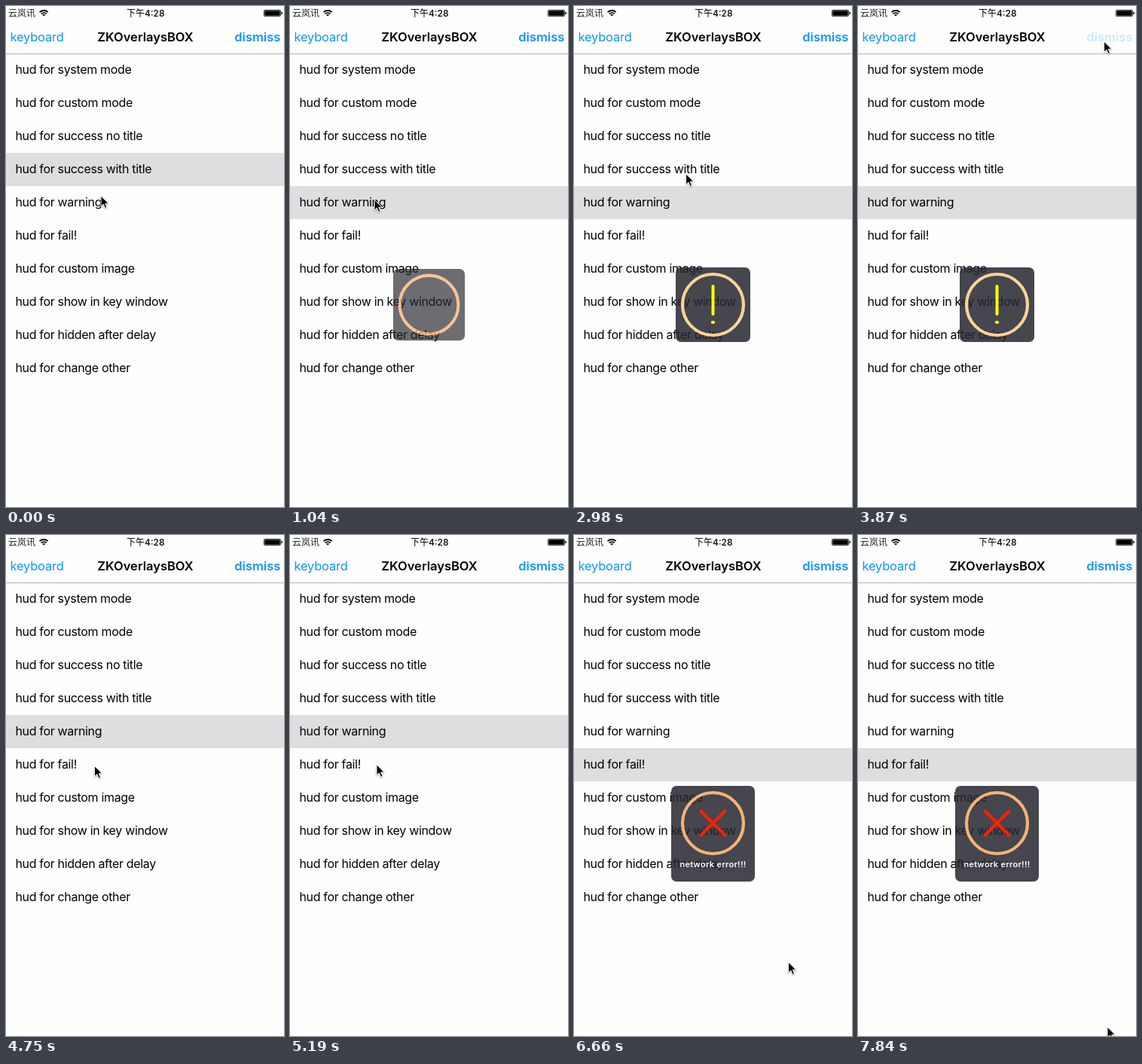
Recreate the animation shown at these times as an HTML page. Size 369 by 665 pixels, loop 7.99 s.

```html
<!DOCTYPE html>
<html lang="zh">
<head>
<meta charset="utf-8">
<title>HUD list</title>
<style>
  html, body { margin: 0; width: 100%; height: 100%; overflow: hidden; background: #fefefe; }
  svg { display: block; width: 100%; height: 100%; }
  text { font-family: Inter, "Noto Sans CJK SC", "Noto Sans CJK", sans-serif; white-space: pre; }
  .row { font-size: 16px; letter-spacing: -.33px; }
  .nav { font-size: 16.5px; }
  .bold { font-weight: 600; }
  .blue { fill: #0f94ff; }
  .status { font-size: 12px; }
  .panel { fill: #252630; fill-opacity: .85; }
  .ring { fill: none; stroke: #f6b275; stroke-width: 4.2; }
  .stroke { fill: none; stroke-width: 4; stroke-linecap: round; }
  #arrow { filter: drop-shadow(.5px 1.5px 1px rgba(0, 0, 0, .35)); }
</style>
</head>
<body>
<svg viewBox="0 0 369 665" preserveAspectRatio="none">
  <rect width="369" height="665" fill="#fefefe"/>
  <rect id="mark" width="369" height="44" fill="#dedede"/>

  <text class="status" x="3" y="13.5" fill="#222">云岚讯</text>
  <g fill="none" stroke="#000" stroke-width="1.8">
    <path d="M44.6 8.2a8 8 0 0 1 11 0M46.7 10.5a5 5 0 0 1 6.8 0"/>
    <path d="M50.1 13.8l-1.9-2a2.8 2.8 0 0 1 3.8 0z" fill="#000" stroke="none"/>
  </g>
  <text class="status" x="160" y="13.5" font-weight="500">下午4:28</text>
  <rect x="342.4" y="5.4" width="22.2" height="8.2" rx="1.4" fill="none" stroke="#000" stroke-width=".8"/>
  <rect x="343.3" y="6.3" width="20.4" height="6.4" rx=".6"/>
  <path d="M365.5 7.8q1.6.2 1.6 1.7t-1.6 1.7z"/>

  <text class="nav blue" x="5.4" y="47" letter-spacing="-.2">keyboard</text>
  <text class="nav bold" x="185" y="47" text-anchor="middle">ZKOverlaysBOX</text>
  <text id="dismiss" class="nav bold blue" x="364.3" y="47" text-anchor="end">dismiss</text>
  <rect y="63" width="369" height="1" fill="#b4b4b4"/>
  <g id="rows"></g>

  <g id="warning">
    <rect class="panel" x="-49.5" y="-49.5" width="99" height="99" rx="7"/>
    <circle id="warnRing" class="ring" r="40.5"/>
    <g id="bang">
      <path id="bar" class="stroke" stroke="#ffff00" d="M0 -24.5V12.5" stroke-dasharray="37 60"/>
      <ellipse id="dot" cy="23.3" rx="2.7" ry="2.1" fill="#ffff00"/>
    </g>
  </g>

  <g id="fail">
    <rect class="panel" x="-55.5" y="-63.5" width="111" height="127" rx="7"/>
    <circle class="ring" cy="-14" r="40.5"/>
    <g id="cross">
      <path class="stroke" stroke="#ff2000" d="M-16 -16L16 16M16 -16L-16 16"/>
    </g>
    <text class="bold" y="44.5" font-size="11" letter-spacing=".3" fill="#fff" text-anchor="middle">network error!!!</text>
  </g>

  <g id="arrow">
    <path d="M0 0V14.2L3.3 11.1L5.6 16.4L8 15.4L5.7 10.2H10.2Z" stroke="#fff" stroke-width="1" stroke-linejoin="round"/>
  </g>
</svg>
<script>
  const LOOP = 7990, BEATS = 54, BEAT = LOOP / BEATS;
  const $ = id => document.getElementById(id);
  const set = (id, name, value) => $(id).setAttribute(name, value);

  const labels = ["system mode", "custom mode", "success no title", "success with title", "warning",
    "fail!", "custom image", "show in key window", "hidden after delay", "change other"];
  labels.forEach((label, i) => {
    const row = document.createElementNS("http://www.w3.org/2000/svg", "text");
    row.setAttribute("class", "row");
    row.setAttribute("x", 12.4);
    row.setAttribute("y", 90 + 44 * i);
    row.textContent = "hud for " + label;
    $("rows").append(row);
  });

  // Keys are [beat, value, ...]; returns the interpolated values.
  function at(n, keys) {
    const i = keys.findIndex(k => k[0] > n);
    if (i === 0) return keys[0].slice(1);
    if (i < 0) return keys[keys.length - 1].slice(1);
    const a = keys[i - 1], b = keys[i], p = (n - a[0]) / (b[0] - a[0]);
    return a.slice(1).map((v, j) => v + (b[j + 1] - v) * p);
  }

  const pointer = [
    [2, 126, 252], [5, 112, 257], [7, 112, 257], [8, 113, 258], [19, 113, 258],
    [25, 326.5, 47], [27, 326.5, 47], [32, 117.5, 306.5], [34, 117.5, 306.5], [36, 112.5, 303],
    [42, 112.5, 303], [46, 342, 655], [48, 279, 568], [50, 279, 568], [53, 331, 653]
  ];
  const popIn = [[0, .9, 0], [.67, .96, .79], [1.67, 1.1, 1], [2.67, 1, 1]];
  const popOut = [[26, 1, 1], [28, .84, 0]];
  const swing = [[10, 0], [11, 20], [12, -20], [13, 20], [14, 20], [15, 0]];
  const crossGrow = [[38, .7, 0], [39, .83, .63], [42, 1, 1]];

  function place(id, scale, opacity) {
    set(id, "transform", `translate(184.5 396.5) scale(${scale})`);
    set(id, "opacity", opacity);
  }

  function draw(n) {
    const [x, y] = at(n, pointer);
    set("arrow", "transform", `translate(${x} ${y})`);
    set("mark", "y", 195 + 44 * (n < 7 ? 0 : n < 36 ? 1 : 2));
    set("dismiss", "opacity", at(n, [[24, 1], [25, .2], [26, .2], [28, 1]])[0]);

    place("warning", ...(n < 26 ? at(n - 6.33, popIn) : at(n, popOut)));
    const [g, b] = at(n, [[7, 178, 117], [9, 211, 150]]);
    $("warnRing").style.stroke = `rgb(250, ${g}, ${b})`;
    const [drawn] = at(n, [[8, 0], [10, 1]]);
    set("bar", "stroke-dashoffset", 37 * (1 - drawn));
    set("bar", "opacity", drawn > 0 ? 1 : 0);
    set("dot", "opacity", drawn < 1 ? 0 : 1);
    set("bang", "transform", `rotate(${at(n, swing)[0]})`);

    place("fail", ...at(n - 35.72, popIn));
    const [size, shown] = at(n, crossGrow);
    set("cross", "transform", `translate(0 -14) scale(${size})`);
    set("cross", "opacity", shown);
  }

  // The screen refreshes once per beat; the small lead keeps changes on time.
  function tick(now) {
    draw(Math.floor((now % LOOP + 15) / BEAT) % BEATS);
    requestAnimationFrame(tick);
  }
  draw(0);
  requestAnimationFrame(tick);
</script>
</body>
</html>
```
